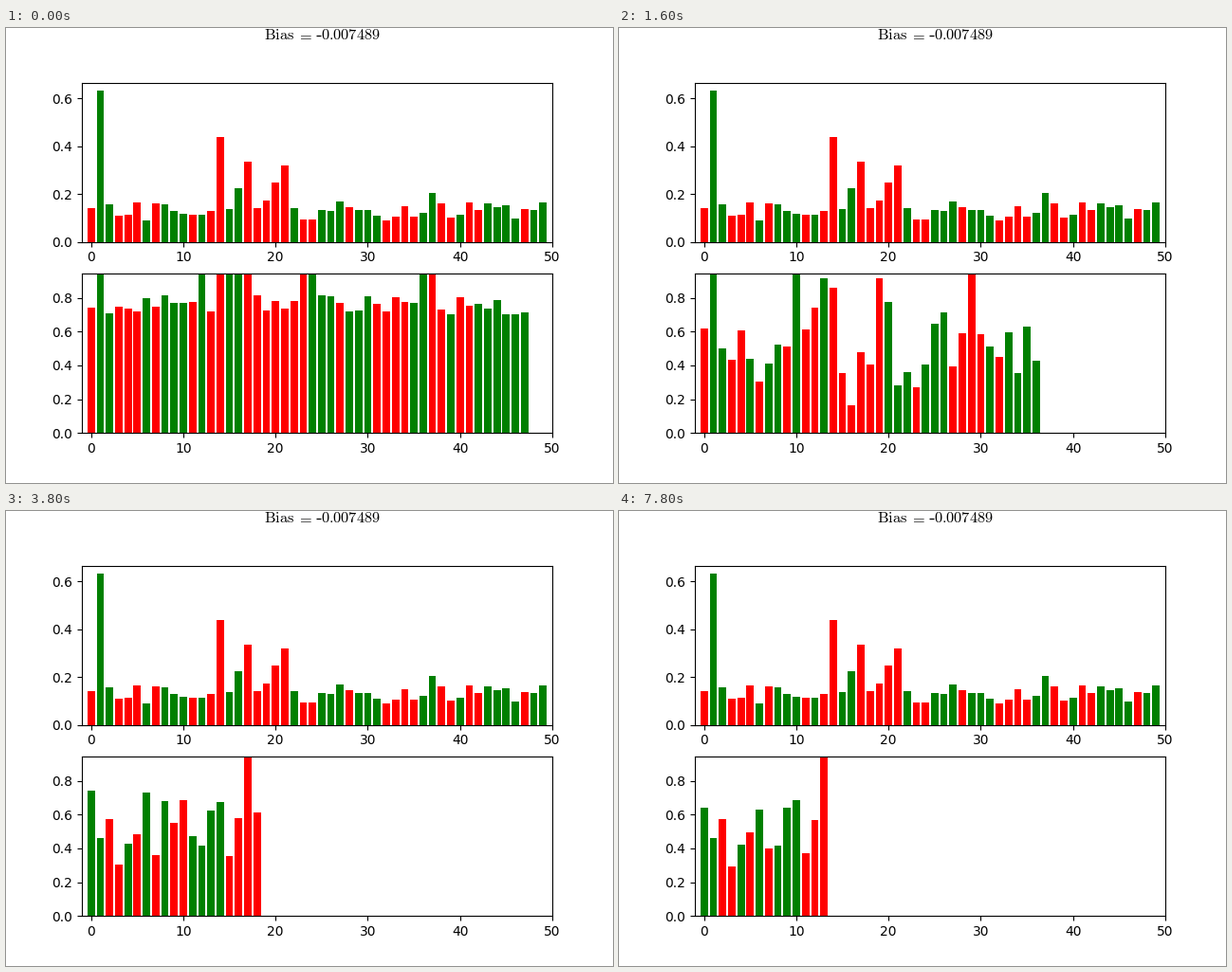
Recreate the animation shown at these times as a matplotlib script. Size 640 px wide and 480 px high, loop 8 s.

```python
import numpy as np
import matplotlib.pyplot as plt
from matplotlib.animation import FuncAnimation
from matplotlib.lines import Line2D

WIDTH, HEIGHT, DPI = 640, 480, 100
STEP_MS, STEPS = 200, 40
N = 50

# Lengths of the alternating red and green runs
RUNS = [1, 2, 3, 1, 1, 3, 1, 1, 2, 2, 5, 1,
        2, 3, 1, 3, 4, 2, 2, 1, 2, 4, 1, 2]
COLORS = np.repeat(["red", "green"] * (len(RUNS) // 2), RUNS)

PEAKS = {1: 0.635, 14: 0.44, 16: 0.225, 17: 0.335,
         20: 0.25, 21: 0.32, 37: 0.205}

# Bars that stay to the end, with the height they settle at
CORE = {1: 0.62, 2: 0.48, 4: 0.595, 7: 0.3, 8: 0.41, 11: 0.485, 12: 0.6,
        17: 0.38, 29: 0.4, 30: 0.63, 31: 0.69, 32: 0.365, 33: 0.59, 38: 1.0}
ABSENT = [22, 47]
LINGER = [0, 3, 6, 18, 26, 28, 48, 39, 15, 24, 25, 14]
TALL = [1, 12, 14, 15, 16, 17, 24, 25, 37, 38]

rng = np.random.default_rng(7)


def put(values, points):
    values[list(points)] = list(points.values())
    return values


top = put(rng.uniform(0.09, 0.175, N), PEAKS)
start = rng.uniform(0.7, 0.82, N)
start[TALL] = 1.3
settled = put(rng.uniform(0.14, 0.65, N), CORE)
fade = np.full(N, 2.5)
fade[TALL] = 12
phase = rng.uniform(0, 2 * np.pi, N)

early = [i for i in range(N) if i not in {*CORE, *ABSENT, *LINGER}]
leaving = [*ABSENT, *rng.permutation(early), *LINGER]


def bars_left(step):
    count = np.interp(step, [0, 6, 12, 19, 24, 27, 30],
                      [48, 40, 30, 19, 17, 15, 14])
    return int(np.ceil(count))


def heights(step):
    """Bars decay to their settled height, then sway a little."""
    sway = 0.02 * np.sin(0.35 * step + phase) * (1 - np.exp(-step / 4))
    return settled + (start - settled) * np.exp(-step / fade) + sway


def make_bars(ax, values, colors, limit):
    bars = ax.bar(range(len(values)), values, color=colors)
    ax.set_xlim(-1, N)
    ax.set_ylim(0, limit)
    return bars


def label(x, y, text, **align):
    fig.text(x / WIDTH, 1 - y / HEIGHT, rf"$\mathrm{{{text}}}$",
             fontsize=11.75, **align)


plt.rcParams["mathtext.fontset"] = "cm"
fig, (upper, lower) = plt.subplots(
    2, 1, figsize=(WIDTH / DPI, HEIGHT / DPI), dpi=DPI)
make_bars(upper, top, COLORS, 0.667)
bars = make_bars(lower, start, COLORS, 0.9435)

label(272.3, 12, "Bias", va="baseline")
label(315, 8, "=", ha="center", va="center")
label(332, 12, "0.007489", va="baseline")
fig.add_artist(Line2D([327.3 / WIDTH, 331.7 / WIDTH], [1 - 8.4 / HEIGHT] * 2,
                      color="black", lw=0.9, solid_capstyle="butt"))


def update(step):
    gone = leaving[:N - bars_left(step)]
    alive = np.delete(np.arange(N), gone)
    values = heights(step)
    for bar in bars:
        bar.set_visible(False)
    for bar, i in zip(bars, alive):
        bar.set_visible(True)
        bar.set_height(values[i])
        bar.set_facecolor(COLORS[i])
    return bars.patches


anim = FuncAnimation(fig, update, frames=STEPS, interval=STEP_MS,
                     init_func=lambda: update(0), repeat=True,
                     repeat_delay=0, blit=False)
plt.show()
```
